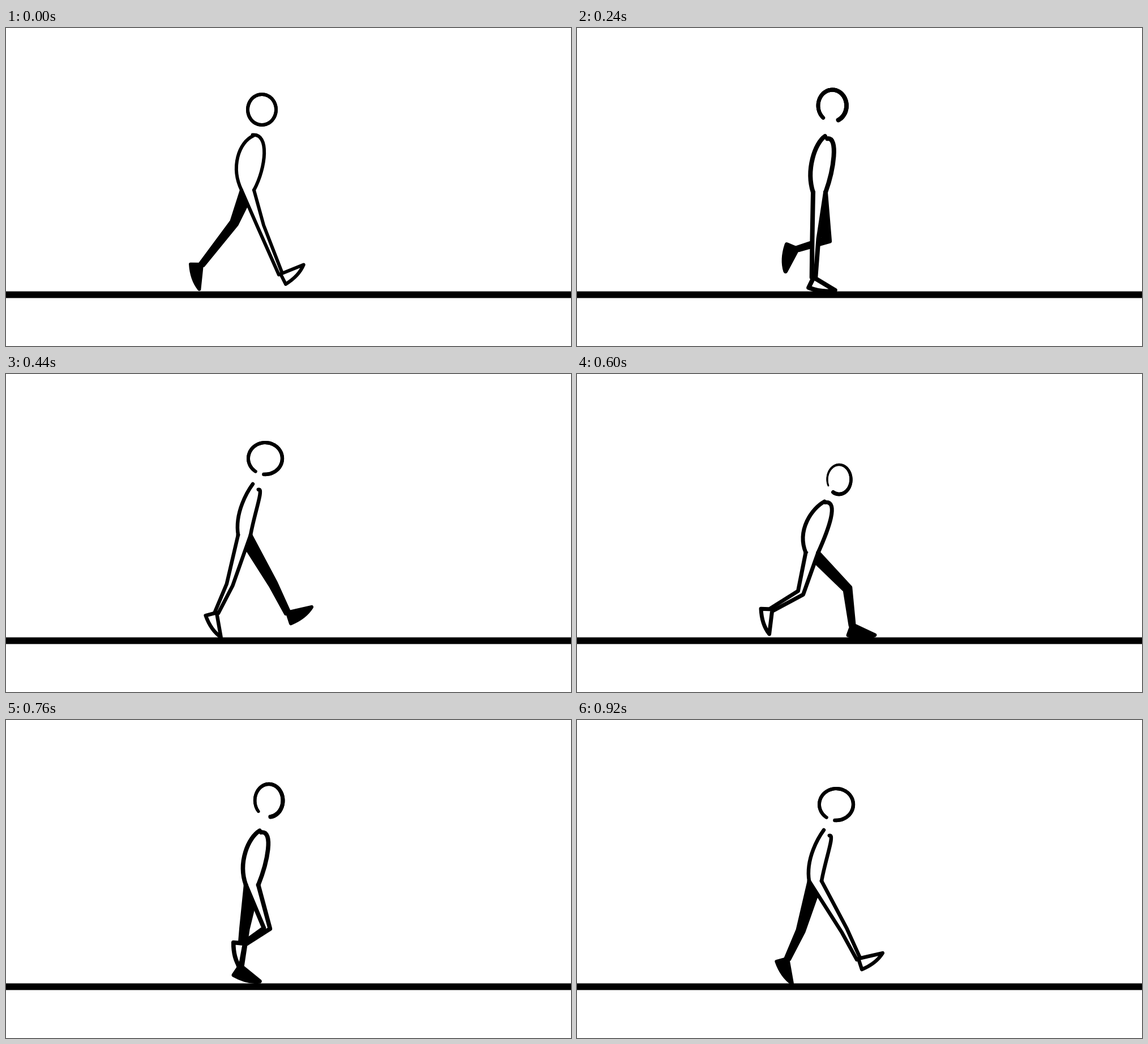
An HTML page with a canvas that plays this animation: 998 px wide and 561 px high, repeating every 960 ms.

```html
<!DOCTYPE html>
<html lang="en">
<head>
<meta charset="utf-8">
<title>Walk cycle</title>
<style>
html, body { margin: 0; height: 100%; overflow: hidden; background: #fff; }
canvas { display: block; }
</style>
</head>
<body>
<canvas id="stage" width="998" height="561"></canvas>
<script>
const ctx = document.getElementById('stage').getContext('2d');
const STEP_MS = 40, HALF = 12, RAD = Math.PI / 180;
const GIRTH = 11, FOOT = 44, HEEL = 20, HEEL_TURN = 85;

// head: centre and radii; chin: start angle and opening of the head line;
// leg: knee, ankle and the foot's angle.
const contact = {
  pen: 6, arch: 1.2, head: [452, 144, 25, 27], chin: [90, 0], neck: [437, 190], hip: [427, 286],
  lead: { knee: [450, 350], ankle: [485, 434], foot: -22 },
  trail: { knee: [403, 344], ankle: [346, 417], foot: 96 }
};
const down = {
  pen: 7, arch: 1, head: [463, 186, 21, 26], chin: [155, 35], neck: [437, 225], hip: [415, 315],
  lead: { knee: [478, 379], ankle: [486, 442], foot: 25 },
  trail: { knee: [395, 386], ankle: [345, 415], foot: 97 }
};
const lift = {
  pen: 7, arch: 0.6, head: [451, 151, 27, 27], chin: [120, 65], neck: [436, 193], hip: [427, 291],
  lead: { knee: [437, 378], ankle: [438, 435], foot: 38 },
  trail: { knee: [431, 364], ankle: [383, 388], foot: 115 }
};
const passing = {
  pen: 8, arch: 0.8, head: [451, 137, 25, 28], chin: [130, 65], neck: [438, 191], hip: [428, 290],
  lead: { knee: [421, 372], ankle: [418, 440], foot: 31 },
  trail: { knee: [441, 374], ankle: [389, 390], foot: 118 }
};
const reach = {
  pen: 7, arch: 1.1, head: [491, 152, 24, 31], chin: [155, 35], neck: [468, 204], hip: [448, 293],
  lead: { knee: [422, 360], ankle: [405, 420], foot: 55 },
  trail: { knee: [501, 355], ankle: [487, 403], foot: 65 }
};
const extend = {
  pen: 6.5, arch: 0.4, head: [458, 149, 30, 28], chin: [125, 30], neck: [436, 194], hip: [421, 284],
  lead: { knee: [395, 372], ankle: [372, 421], foot: 80 },
  trail: { knee: [472, 371], ankle: [497, 421], foot: -13 }
};
// After half a cycle the legs trade roles.
const nextContact = { ...contact, lead: contact.trail, trail: contact.lead };
const keys = [[0, contact], [3, down], [5, lift], [6, passing], [9, reach], [11, extend], [HALF, nextContact]];

function mix(a, b, k) {
  if (typeof a === 'number') return a + (b - a) * k;
  if (Array.isArray(a)) return a.map((v, i) => mix(v, b[i], k));
  return Object.fromEntries(Object.keys(a).map(key => [key, mix(a[key], b[key], k)]));
}

function poseAt(step) {
  const i = keys.findLastIndex(([at]) => at <= step);
  const [t0, from] = keys[i], [t1, to] = keys[i + 1];
  return mix(from, to, (step - t0) / (t1 - t0));
}

const shift = ([x, y], dx, dy = 0) => [x + dx, y + dy];
const polar = ([x, y], r, deg) => [x + r * Math.cos(deg * RAD), y + r * Math.sin(deg * RAD)];

function trace(pts) {
  ctx.beginPath();
  pts.forEach(p => ctx.lineTo(...p));
}

function curve(a, b, c, d) {
  ctx.beginPath();
  ctx.moveTo(...a);
  ctx.bezierCurveTo(...b, ...c, ...d);
  ctx.stroke();
}

function drawLeg(hip, { knee, ankle, foot }, color) {
  const across = Math.atan2(ankle[1] - hip[1], ankle[0] - hip[0]) / RAD - 90;
  const edge = side => [
    shift(hip, side * GIRTH),
    polar(knee, side * GIRTH * 0.5, across),
    polar(ankle, side * GIRTH * 0.3, across)
  ];
  const rear = edge(-1), front = edge(1);
  ctx.fillStyle = color;
  trace([...rear, ...front.slice().reverse()]);
  ctx.fill();
  for (const side of [rear, front]) {
    trace(side);
    ctx.stroke();
  }

  // The sole bows slightly away from the ankle.
  const toe = polar(ankle, FOOT, foot), heel = polar(ankle, HEEL, foot + HEEL_TURN);
  const sole = polar(mix(toe, heel, 0.5), 8, foot + HEEL_TURN / 2);
  trace([ankle, toe]);
  ctx.quadraticCurveTo(...sole, ...heel);
  ctx.closePath();
  ctx.fill();
  ctx.stroke();
}

function drawTorso({ neck, hip, arch }) {
  const collar = (1.1 - arch) * 14;
  const chest = shift(neck, collar, collar);
  const rear = shift(hip, -GIRTH), front = shift(hip, GIRTH);
  curve(neck, shift(neck, -22 * arch, 12), shift(rear, -16 * arch, -40), rear);
  curve(chest, shift(chest, 25 * arch, -3), shift(front, 18 * arch, -40), front);
}

// One pen sweep; the more the chin tilts, the lighter it starts.
function drawHead({ head: [x, y, rx, ry], chin: [from, gap], pen }) {
  const touch = Math.min(1, (180 - from) / 60), count = 60;
  const sweep = (360 - gap) / count * RAD;
  for (let i = 0; i < count; i++) {
    const angle = from * RAD + i * sweep;
    ctx.lineWidth = pen * mix(touch, 1, i / count);
    ctx.beginPath();
    ctx.ellipse(x, y, rx, ry, 0, angle, angle + sweep);
    ctx.stroke();
  }
}

function draw(now) {
  const step = Math.floor(now / STEP_MS) % (2 * HALF);
  const pose = poseAt(step % HALF);
  const [near, far] = step < HALF ? [pose.lead, pose.trail] : [pose.trail, pose.lead];
  ctx.fillStyle = '#fff';
  ctx.fillRect(0, 0, 998, 561);
  ctx.strokeStyle = '#000';
  ctx.lineCap = ctx.lineJoin = 'round';
  ctx.lineWidth = pose.pen;
  drawLeg(pose.hip, far, '#000');
  drawLeg(pose.hip, near, '#fff');
  drawTorso(pose);
  drawHead(pose);
  ctx.fillStyle = '#000';
  ctx.fillRect(0, 464.6, 998, 11.8);
}

function tick() {
  draw(performance.now());
  requestAnimationFrame(tick);
}
tick();
</script>
</body>
</html>
```
